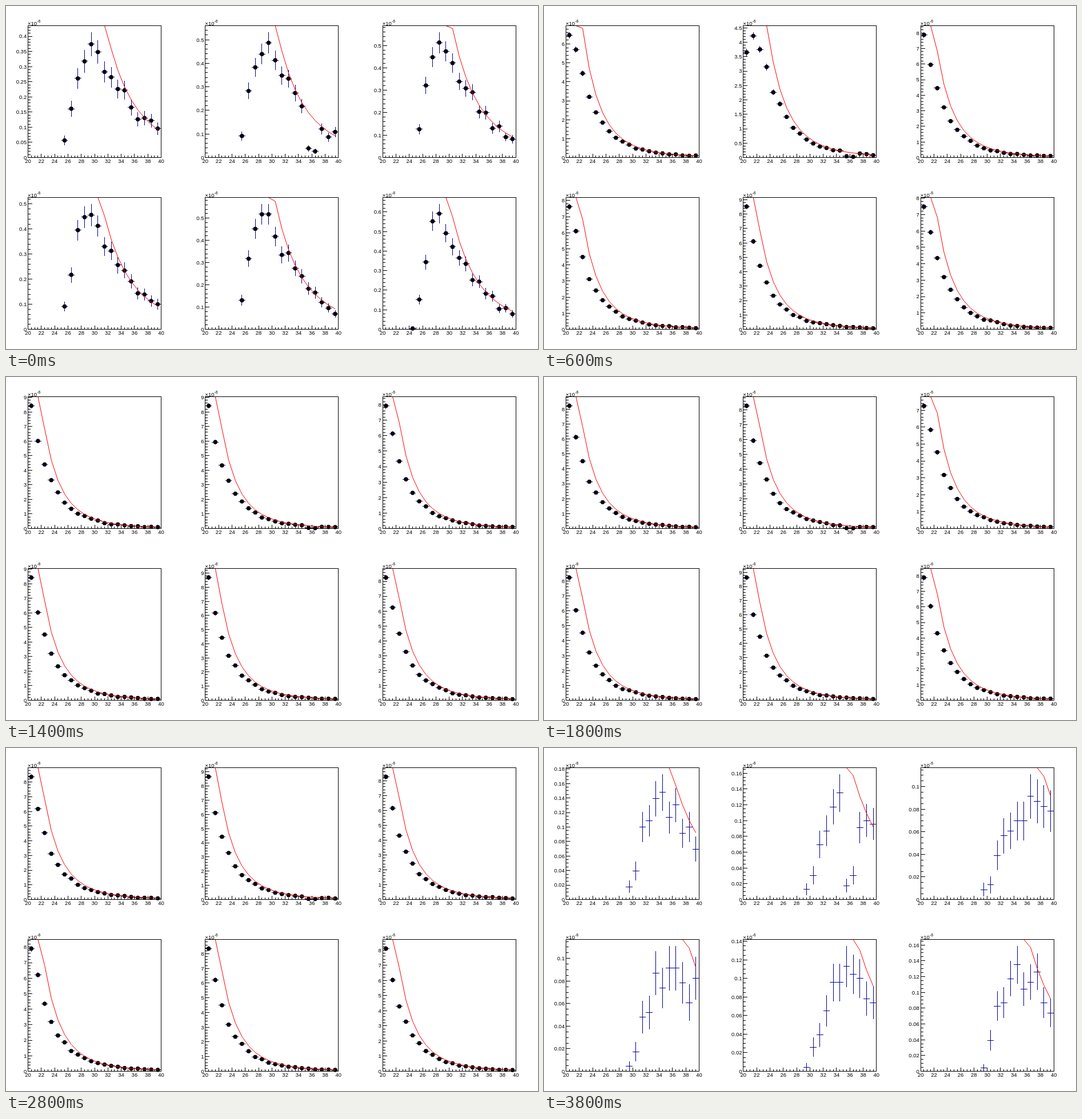
An HTML page for the animation above (4 s loop, 931 by 601 pixels).

```html
<!DOCTYPE html>
<html lang="en">
<head>
<meta charset="utf-8">
<title>Six spectra</title>
<style>
html, body { margin: 0; width: 100%; height: 100%; overflow: hidden; background: #fff; }
svg { display: block; width: 931px; height: 601px; }
text { font: 9.5px "Liberation Sans", Arial, sans-serif; fill: #000; }
path { fill: none; stroke: #000; stroke-width: 1; }
.crisp { shape-rendering: crispEdges; }
.err { stroke: #000099; }
.fit { stroke: #ff0000; stroke-linejoin: round; }
</style>
</head>
<body>
<svg id="stage" viewBox="0 0 931 601"></svg>
<script>
const STEP = 200, STEPS = 20;
const W = 233, H = 231, BIN = W / 20, PITCH = 931 / 3;
const UNIT = 1 / 230; // height of one count
const BINS = Array.from({ length: 20 }, (_, i) => 20 + i);

// Turn-on point and highest count of each panel at a few steps
const KEYS = [
  { step: 0, onset: 24.4, peaks: [86, 112, 118, 105, 119, 136] },
  { step: 3, onset: 18, peaks: [1488, 971, 1812, 1753, 1962, 1720] },
  { step: 5, onset: 18, peaks: [1985, 1971, 1985, 1985, 2012, 1985] },
  { step: 9, onset: 18, peaks: [1891, 1904, 1668, 1893, 1985, 1812] },
  { step: 14, onset: 18, peaks: [1923, 1990, 1902, 1817, 1921, 1863] },
  { step: 17, onset: 21.7, peaks: [363, 288, 245, 206, 275, 304] },
  { step: 19, onset: 28.7, peaks: [34, 31, 21, 21, 26, 31] }
];

// Red curve: a power law with a slight bend
function fitAt(x) {
  const u = Math.log(x / 30);
  return Math.exp(-0.4264 - 7.629 * u + 1.85 * u * u);
}

// Points lie below the curve on the left and approach it on the right
const fullCount = x => fitAt(x) * (1 - 0.455 * Math.exp((20.5 - x) / 8)) / UNIT;

function expected(bin, onset, spread) {
  const x = bin + 0.5, d = Math.max(0, x - onset) / spread;
  return fullCount(x) * (1 - Math.exp(-d * d));
}

// Repeatable noise from -1 to 1
function noise(step, panel, bin) {
  const s = Math.sin(step * 127.1 + panel * 311.7 + bin * 74.7) * 43758.5453;
  return 2 * (s - Math.floor(s)) - 1;
}

function stateAt(step, panel) {
  const i = Math.max(1, KEYS.findIndex(k => k.step >= step));
  const a = KEYS[i - 1], b = KEYS[i];
  const t = (step - a.step) / (b.step - a.step);
  const mix = (p, q) => p + (q - p) * t;
  return {
    onset: mix(a.onset, b.onset),
    peak: Math.round(mix(Math.sqrt(a.peaks[panel]), Math.sqrt(b.peaks[panel])) ** 2)
  };
}

// Bisect for the turn-on width that gives the wanted peak
function spreadFor(onset, goal) {
  let low = 0.1, high = 60;
  for (let i = 0; i < 40; i++) {
    const mid = (low + high) / 2;
    const best = Math.max(...BINS.map(b => expected(b, onset, mid)));
    if (best > goal) low = mid; else high = mid;
  }
  return low;
}

function pointsOf(step, panel) {
  const { onset, peak } = stateAt(step, panel);
  const spread = spreadFor(onset, peak - Math.sqrt(peak) / 2);
  const mean = BINS.map(b => expected(b, onset, spread));
  const best = mean.indexOf(Math.max(...mean));
  return BINS.map((bin, i) => {
    const weak = panel === 1 && (bin === 35 || bin === 36) ? 0.2 : 1;
    const n = mean[i] * weak;
    const drawn = Math.round(n + noise(step, panel, bin) * Math.sqrt(n));
    return { bin, n: i === best ? peak : Math.min(peak, drawn) };
  }).filter(p => p.n > 0);
}

function tickStep(top) {
  const raw = top / 10, power = 10 ** Math.floor(Math.log10(raw));
  const lead = [1, 2, 5, 10].find(k => k * power >= raw);
  return { size: lead * power, parts: lead === 2 ? 4 : 5 };
}

const crisp = v => Math.floor(v) + 0.5;
const path = (cls, d) => `<path class="${cls}" d="${d}"/>`;
const label = (x, y, anchor, s, size = 9.5) =>
  `<text x="${x}" y="${y}" text-anchor="${anchor}" style="font-size:${size}px">${s}</text>`;

function drawPanel(step, panel) {
  const left = 38.5 + (panel % 3) * PITCH, right = left + W;
  const top = panel < 3 ? 34.5 : 335.5, base = top + H;
  const points = pointsOf(step, panel);
  const max = 1.05 * UNIT * Math.max(...points.map(p => p.n + Math.sqrt(p.n)));
  const X = v => left + (v - 20) * BIN;
  const Y = v => base - Math.min(1, Math.max(0, v / max)) * H;

  let axes = `M${crisp(left)} ${top}H${crisp(right)}V${base}H${crisp(left)}z`, text = "";
  for (let i = 0; i <= 40; i++) {
    const v = 20 + i / 2, major = i % 4 === 0;
    axes += `M${crisp(X(v))} ${base}v${major ? -7 : -4}`;
    if (major) text += label(X(v), base + 9.5, "middle", v);
  }
  const { size, parts } = tickStep(max);
  for (let i = 0; i * size / parts <= max; i++) {
    const v = i * size / parts, major = i % parts === 0;
    axes += `M${crisp(left)} ${crisp(Y(v))}h${major ? 7 : 4}`;
    if (major) text += label(left - 2.3, Y(v) + 3.4, "end", +v.toFixed(3));
  }
  text += label(left - 0.5, top - 1, "start", "×10") + label(left + 15.7, top - 5.5, "start", "-6", 7);

  const dots = step < STEPS - 1;
  let bars = "", marks = "";
  for (const { bin, n } of points) {
    const x = X(bin + 0.5), y = Y(n * UNIT), e = Math.sqrt(n);
    bars += `M${crisp(x)} ${Y((n + e) * UNIT)}V${Y((n - e) * UNIT)}`;
    bars += `M${X(bin)} ${crisp(y)}H${X(bin + 1)}`;
    if (dots) marks += `<circle cx="${x}" cy="${y}" r="3.7"/>`;
  }

  // The curve enters from the last bin that reaches the top edge
  const fit = BINS.map(b => b + 0.5).filter(x => fitAt(x + 1) < max)
    .map(x => `${X(x)} ${Y(fitAt(x))}`).join("L");

  return path("crisp err", bars) + marks + path("fit", "M" + fit) + path("crisp", axes) + text;
}

const stage = document.getElementById("stage");
const scenes = Array.from({ length: STEPS }, (_, step) =>
  [0, 1, 2, 3, 4, 5].map(panel => drawPanel(step, panel)).join(""));

let shown = -1;
function show(now) {
  const step = Math.floor(now / STEP) % STEPS;
  if (step !== shown) stage.innerHTML = scenes[shown = step];
}
const begin = performance.now();
function tick() {
  show(performance.now() - begin);
  requestAnimationFrame(tick);
}
tick();
</script>
</body>
</html>
```
